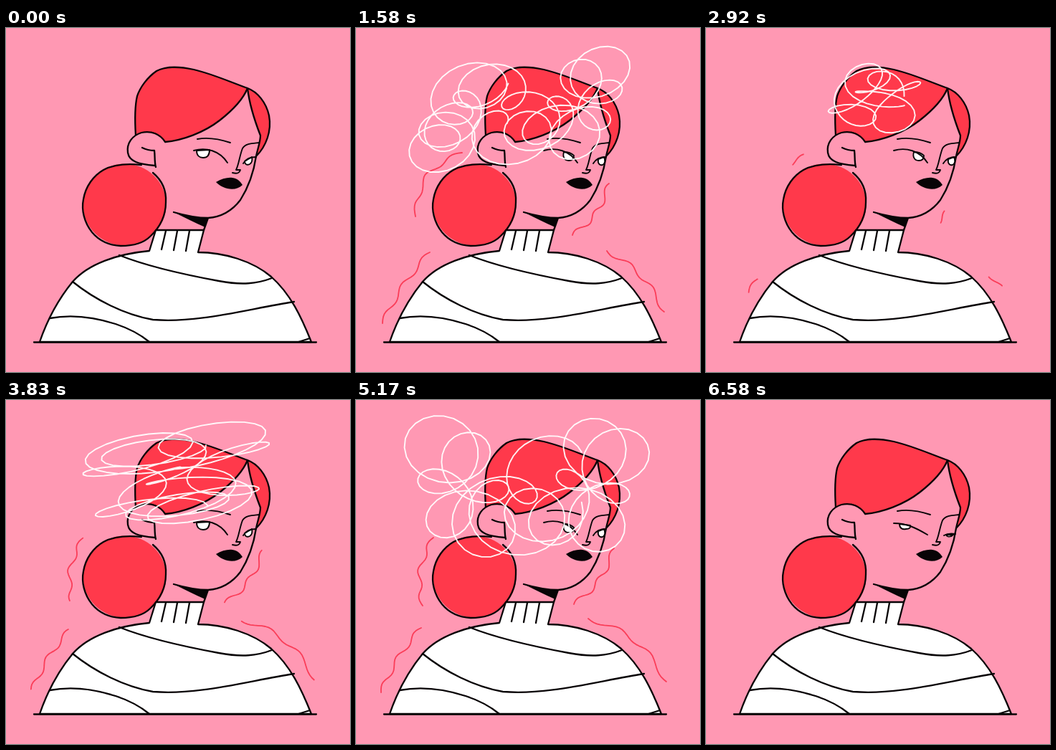
Write an HTML page that moves like this. It is 480 by 480 pixels and loops after 6.66 s.

```html
<!DOCTYPE html>
<html lang="en">
<head>
<meta charset="utf-8">
<title>Tangled thoughts</title>
<style>
  html, body { margin: 0; width: 100%; height: 100%; overflow: hidden; background: #ff98b3; }
  svg { display: block; width: 100%; height: 100%; }
  .ink { fill: none; stroke: #080406; stroke-width: 2.3; }
  .fine { stroke-width: 1.9; }
  .red { fill: #ff394b; }
  .pink { fill: #ff98b3; }
  .wool { fill: #fff; }
  #shakes { fill: none; stroke: #fa3d58; stroke-width: 1.8; }
  #tangle { fill: none; stroke: #fff; stroke-width: 1.9; opacity: .93; }
</style>
</head>
<body>
<svg viewBox="0 0 480 480" stroke-linecap="round" stroke-linejoin="round">
  <rect class="pink" width="480" height="480"/>

  <!-- jaw and neck -->
  <path d="M234 257C250 262 266 265 282 265L278 278C264 272 249 264 234 257Z" fill="#080406"/>
  <path class="ink" d="M349 179C346 199 339 221 327 240C314 257 297 264 282 265C265 265 248 261 234 257M282 265L276 282"/>

  <!-- hair -->
  <path class="ink red" d="M181 150C180 134 179 112 183 95C187 83 197 69 210 60C221 54 240 53 262 58C288 64 312 75 337 84C331 99 316 115 298 129C276 146 246 157 222 159C219 154 212 148 204 146Z"/>
  <path class="ink red" d="M337 84C351 89 363 104 367 122C371 144 363 165 349 179C351 169 355 159 355 150C348 132 340 110 337 84Z"/>

  <!-- bun and ear -->
  <ellipse class="red" cx="165.5" cy="246.5" rx="58" ry="57"/>
  <path class="ink" d="M205 202C217 212 224 226 223 243C223 261 215 278 201 291C191 301 176 304 160 304C142 303 130 297 120 285C109 271 105 254 108 239C111 221 122 206 136 198C151 190 170 189 189 191"/>
  <path class="pink" d="M222 159C215 148 203 143 189 146C176 150 168 161 170 174C172 186 184 190 209 193Z"/>
  <path class="ink" d="M222 159C215 148 203 143 189 146C176 150 168 161 170 174C172 186 184 190 208 192M190 167C194 169 200 171 207 171C208 178 207 187 209 194"/>

  <!-- face -->
  <path class="ink fine" d="M267 155C283 152 298 155 313 160M353 160C344 161 334 161 330 168C326 178 325 190 321 198L327 198C326 202 323 204 316 202"/>
  <path d="M293 215C301 210 310 208 316 209C323 210 327 214 330 219C325 224 317 226 309 224C301 222 297 219 293 215Z" fill="#080406"/>
  <g class="ink fine">
    <path id="whites" class="wool"/>
    <path id="lids"/>
  </g>

  <!-- sweater -->
  <path class="ink wool" d="M209 282H276L268 313C304 313 344 325 370 347C397 371 412 403 426 438H47C58 406 75 376 93 354C115 329 156 315 200 311Z"/>
  <path class="ink" d="M223 283L217 309M239 283L234 310M256 283L251 311M158 317C193 331 248 344 297 353C329 359 350 357 371 349M93 354C124 379 165 400 205 407C268 412 333 393 402 382M61 405C93 399 125 404 153 413C174 420 188 428 200 438M408 438L424 433M39 438.5H433"/>

  <g id="shakes"></g>
  <path id="tangle"/>
</svg>
<script>
const LOOP = 6660, FRAMES = 80, CYCLE = 41, TAU = 2 * Math.PI;
const $ = id => document.getElementById(id);
const toPath = pts => "M" + pts.map(p => p.map(v => v.toFixed(1))).join("L");
const sample = (n, fn) => Array.from({ length: n + 1 }, (_, i) => fn(i / n));

// Scribbles: a pen circling (rx, ry) while its centre roams (sx, sy) about (x, y)
const tangles = {
  small: { x: 235, y: 98, sx: 34, sy: 30, rx: 38, ry: 20, turns: 6, lean: -.1, seed: 1 },
  flat: { x: 238, y: 108, sx: 64, sy: 46, rx: 78, ry: 20, turns: 11, lean: -.13, seed: 4 },
  cloud: { x: 228, y: 113, sx: 112, sy: 42, rx: 42, ry: 34, turns: 15, lean: -.13, seed: 2 },
  storm: { x: 238, y: 120, sx: 118, sy: 54, rx: 53, ry: 46, turns: 13, lean: 0, seed: 5 }
};

function scribble({ x, y, sx, sy, rx, ry, turns, lean, seed }) {
  return toPath(sample(turns * 24, t => {
    const q = TAU * turns * t, roam = TAU * t + seed;
    const r = .85 + .25 * Math.sin(5 * roam);
    const dx = sx * Math.cos(roam) + rx * r * Math.cos(q);
    const dy = sy * Math.sin(2.6 * roam) + ry * r * Math.sin(q);
    return [x + dx, y + dy + lean * dx];
  }));
}
for (const k in tangles) tangles[k].d = scribble(tangles[k]);

// Shiver lines: two poses of [x1, y1, x2, y2, bow], and the spot each shrinks to
const shakes = [
  { poses: [[148, 174, 83, 263, 20], [108, 192, 93, 287, 11]], spot: .1 },
  { poses: [[103, 313, 37, 412, 5], [91, 318, 35, 408, 5]], spot: .5 },
  { poses: [[353, 217, 302, 289, -9], [360, 207, 304, 285, -9]], spot: .6 },
  { poses: [[350, 311, 430, 396, -11], [324, 305, 433, 393, -17]], spot: .6 }
];

function shiver([x1, y1, x2, y2, bow], mid, len) {
  const dx = x2 - x1, dy = y2 - y1, l = Math.hypot(dx, dy);
  const from = Math.max(0, mid - len / 2), to = Math.min(1, mid + len / 2);
  return toPath(sample(30, s => {
    const u = from + (to - from) * s;
    const off = bow * Math.sin(Math.PI * u) + 3.5 * Math.sin(2.5 * TAU * u);
    return [x1 + dx * u - dy / l * off, y1 + dy * u + dx / l * off];
  }));
}
for (const s of shakes) s.el = $("shakes").appendChild(document.createElementNS("http://www.w3.org/2000/svg", "path"));

const openLids = "M262 171C279 166 298 171 309 188M331 189C335 182 341 180 349 180";
const eyes = {
  left: ["M266 171C266 178 270 181 275 181C281 181 284 177 284 170ZM333 186C333 190 336 192 340 190C343 188 344 184 343 180Z", openLids],
  right: ["M290 173C288 180 291 185 297 185C302 185 304 182 304 178C300 174 295 173 290 173ZM338 183C337 189 340 192 344 191C348 189 348 184 346 180Z", openLids],
  half: ["M270 173C270 179 274 181 279 180C284 180 286 178 285 175ZM335 188C336 191 341 192 345 188Z",
    "M262 172C280 172 292 178 309 188M332 189C337 186 342 186 348 187"]
};

function draw(ms) {
  const frame = Math.floor((ms % LOOP + 5) / (LOOP / FRAMES)) % FRAMES;
  const ph = frame % CYCLE;
  const pose = (ph + 1 >> 1) % 2;                          // drawings are held for two steps
  const stress = Math.min(ph / 7, (37 - ph) / 14);         // quick rise, slow fall

  const look = ph === 16 || ph === 38 ? "half" : ph > 16 && ph < 38 ? "right" : "left";
  $("whites").setAttribute("d", eyes[look][0]);
  $("lids").setAttribute("d", eyes[look][1]);

  $("tangle").style.display = $("shakes").style.display = stress > 0 ? "" : "none";
  if (stress <= 0) return;

  const t = tangles[stress < .35 ? "small" : stress < .8 ? "flat" : pose ? "storm" : "cloud"];
  const el = $("tangle");
  el.setAttribute("d", t.d);
  el.setAttribute("pathLength", 1);
  el.setAttribute("stroke-dasharray", `${Math.min(1, stress * 8)} 2`);
  el.setAttribute("transform", `rotate(${2 * Math.sin(ph * Math.PI / 3)} ${t.x} ${t.y})`);

  const len = Math.min(1, stress * 1.3);
  for (const s of shakes) {
    const mid = s.spot + (.5 - s.spot) * len;
    s.el.setAttribute("d", shiver(s.poses[pose], mid, len));
  }
}

const start = performance.now();
function tick(now) {
  draw(Math.max(0, now - start));
  requestAnimationFrame(tick);
}
draw(0);
requestAnimationFrame(tick);
</script>
</body>
</html>
```
